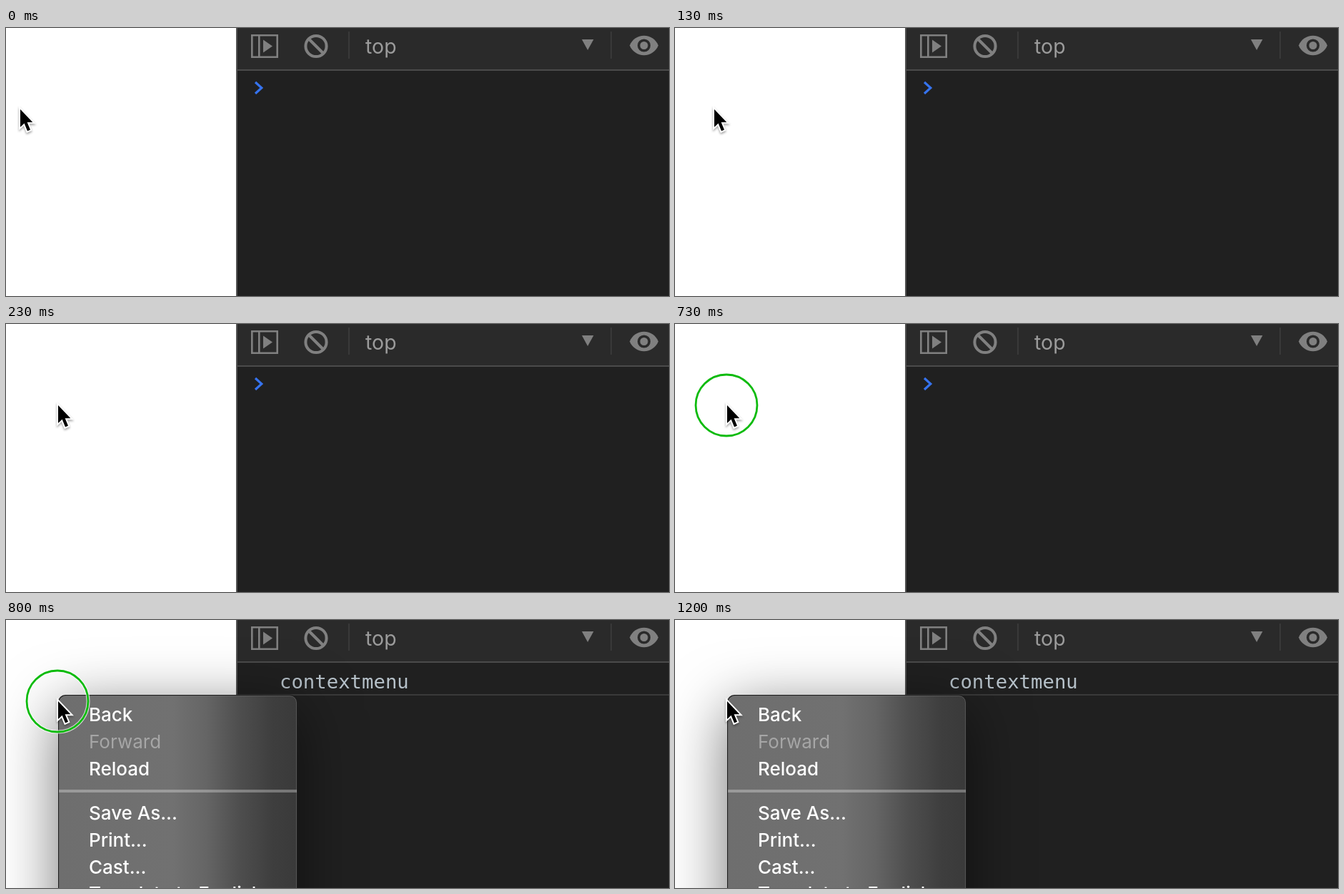
Animation of 928 by 376 pixels, one loop 2.11 s. Source, as an HTML page:

```html
<!DOCTYPE html>
<html lang="en">
<head>
<meta charset="utf-8">
<title>Context menu event</title>
<style>
html, body { margin: 0; width: 100%; height: 100%; overflow: hidden; background: #fff; }
svg { display: block; width: 928px; height: 376px; }

.label { font: 28.5px Inter, sans-serif; fill: #9b9b9b; }
.log { font: 27.3px "DejaVu Sans Mono", monospace; fill: #b6c1c9; }
.items { font: 500 26px Inter, sans-serif; fill: #fff; }
.items .off { font-weight: 400; fill: #a6a6a6; }
.icon { fill: none; stroke: #808080; }
.solid { fill: #808080; }

.pointer, .prompt, .entry, .menu, .ring { animation: 2110ms step-end infinite; }
.pointer { animation-name: glide; }
.prompt { animation-name: drop; }
.entry { animation-name: entry; }
.menu { animation-name: menu; }
.ring { animation-name: ring; }
.sheet { filter: drop-shadow(0 19px 42px rgba(0, 0, 0, .55)); }
.arrow { filter: drop-shadow(0 2px 1.5px rgba(0, 0, 0, .35)); }

@keyframes glide {
  0% { transform: translate(20px, 114px); }
  1.42% { transform: translate(23px, 114px); }
  2.84% { transform: translate(32px, 114px); }
  4.73% { transform: translate(44px, 114px); }
  6.16% { transform: translate(55px, 114px); }
  8.05% { transform: translate(64px, 114px); }
  9.47% { transform: translate(70px, 114px); }
  10.9%, 100% { transform: translate(73px, 114px); }
}
@keyframes drop {
  0% { transform: none; }
  36.49%, 100% { transform: translateY(48px); }
}
@keyframes entry {
  0% { visibility: hidden; }
  36.49%, 100% { visibility: visible; }
}
@keyframes menu {
  0% { visibility: hidden; }
  37.91%, 100% { visibility: visible; }
}
@keyframes ring {
  0% { visibility: hidden; }
  34.59% { visibility: visible; }
  39.33%, 100% { visibility: hidden; }
}
</style>
</head>
<body>
<svg viewBox="0 0 928 376">
  <defs>
    <linearGradient id="glass">
      <stop offset="0" stop-color="#6e6e6e"/>
      <stop offset=".48" stop-color="#717171"/>
      <stop offset=".62" stop-color="#656565"/>
      <stop offset=".76" stop-color="#4e4e4e"/>
      <stop offset=".9" stop-color="#3e3e3e"/>
      <stop offset="1" stop-color="#3a3a3a"/>
    </linearGradient>
  </defs>
  <rect width="928" height="376" fill="#fff"/>

  <!-- Console panel -->
  <rect x="322" width="606" height="376" fill="#202020"/>
  <rect x="322" width="606" height="58" fill="#2a2a2a"/>
  <rect x="322" y="58" width="606" height="2" fill="#4b4b4b"/>
  <rect x="322" width="2" height="376" fill="#505050"/>
  <path d="M480 5V43M847 5V43" stroke="#393939" stroke-width="2"/>
  <path class="icon" stroke-width="2.6" d="M344.3 10.3H379.7V40.7H344.3ZM354.3 10V41"/>
  <path class="solid" d="M360 16.5L373 25.5L360 34.5Z"/>
  <circle class="icon" cx="434" cy="25.5" r="14.6" stroke-width="4"/>
  <path class="icon" stroke-width="4" d="M424 15.5L444 35.5"/>
  <text class="label" x="503" y="36">top</text>
  <path class="solid" d="M806 16H822.5L814.2 31Z"/>
  <path class="solid" d="M873 24.5C876 16.5 884 10.8 893 10.8S910 16.5 913 24.5C910 32.5 902 38.2 893 38.2S876 32.5 873 24.5Z"/>
  <circle cx="893" cy="24.5" r="7.3" fill="#808080" stroke="#2a2a2a" stroke-width="3.6"/>

  <g class="entry">
    <text class="log" x="383" y="96">contextmenu</text>
    <rect x="324" y="104" width="604" height="2" fill="#3a3a3a"/>
  </g>
  <path class="prompt" d="M349 76L357.8 84L349 92" fill="none" stroke="#3673ee" stroke-width="3.2"/>

  <g class="menu">
    <rect class="sheet" x="73" y="105" width="335" height="640" rx="10" fill="#1c1c1c"/>
    <rect x="74.5" y="106.5" width="332" height="637" rx="9" fill="url(#glass)" stroke="#fff" stroke-opacity=".2"/>
    <rect x="74" y="238" width="333" height="4" fill="#fff" fill-opacity=".3"/>
    <g class="items">
      <text x="116" y="142">Back</text>
      <text x="116" y="180" class="off">Forward</text>
      <text x="116" y="218">Reload</text>
      <text x="116" y="280">Save As...</text>
      <text x="116" y="318">Print...</text>
      <text x="116" y="356">Cast...</text>
      <text x="116" y="393">Translate to English</text>
    </g>
  </g>

  <g class="ring" fill="none">
    <circle cx="72" cy="114" r="43" stroke="#fff" stroke-opacity=".7" stroke-width="5"/>
    <circle cx="72" cy="114" r="43" stroke="#0dbb0d" stroke-width="2.8"/>
  </g>

  <g class="pointer">
    <path class="arrow" d="M0 0V25L5.6 19.8L10 30.5L14 28.8L9.6 18.3H17.3Z" stroke="#fff" stroke-width="4" paint-order="stroke"/>
  </g>
</svg>
</body>
</html>
```
